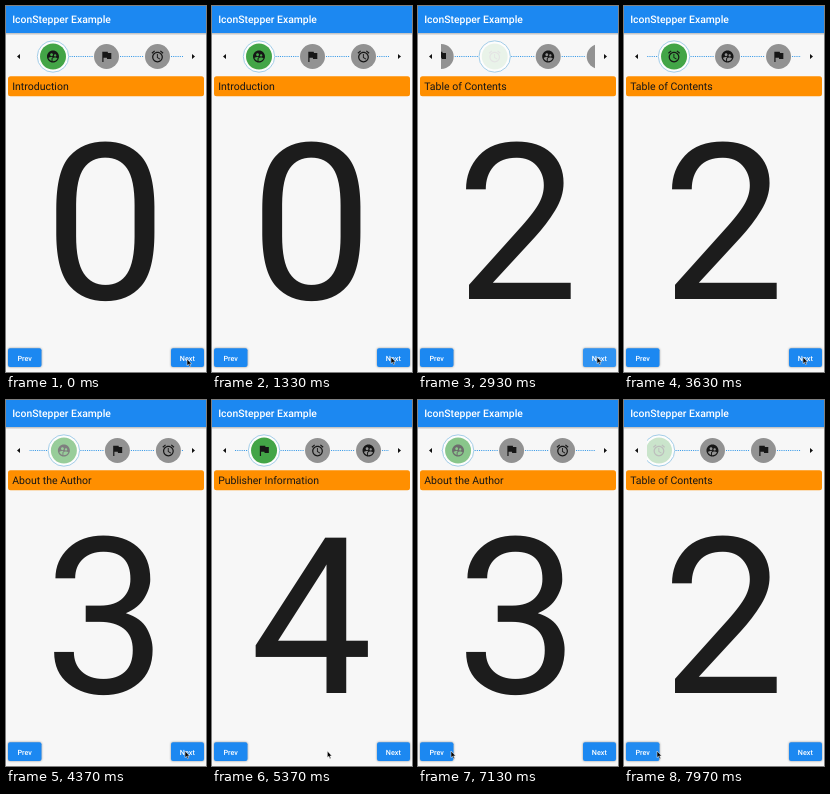
An HTML page for the animation above (8000 ms loop, 200x366 px).

```html
<!DOCTYPE html>
<html lang="en">
<head>
<meta charset="utf-8">
<title>Icon stepper</title>
<style>
  html, body { margin: 0; width: 100%; height: 100%; overflow: hidden; background: #f7f7f7; }
  svg { display: block; width: 100vw; height: 100vh; }
  text { font-family: Roboto, Arial, sans-serif; text-rendering: geometricPrecision; }
  .btn rect { fill: #1c88f1; filter: drop-shadow(0 .8px .8px rgba(0, 0, 0, .4)); }
  .btn .glow { fill: #fff; filter: none; }
  .btn text { fill: #fff; font-size: 7.2px; font-weight: 500; text-anchor: middle; }
</style>
</head>
<body>
<svg viewBox="0 0 200 366" xmlns="http://www.w3.org/2000/svg">
  <defs>
    <clipPath id="view"><rect x="23" y="30" width="154" height="40"/></clipPath>
    <linearGradient id="shade" x2="0" y2="1">
      <stop stop-color="#000" stop-opacity=".25"/>
      <stop offset="1" stop-color="#000" stop-opacity="0"/>
    </linearGradient>
    <path id="people" d="M11.99 2c-5.52 0-10 4.48-10 10s4.48 10 10 10 10-4.48 10-10-4.48-10-10-10zm3.61 6.34c1.07 0 1.93.86 1.93 1.93 0 1.07-.86 1.93-1.93 1.93-1.07 0-1.93-.86-1.93-1.93-.01-1.07.86-1.93 1.93-1.93zm-6-1.58c1.3 0 2.36 1.06 2.36 2.36 0 1.3-1.06 2.36-2.36 2.36s-2.36-1.06-2.36-2.36c0-1.31 1.05-2.36 2.36-2.36zm0 9.13v3.75c-2.4-.75-4.3-2.6-5.14-4.96 1.05-1.12 3.67-1.69 5.14-1.69.53 0 1.2.08 1.9.22-1.64.87-1.9 2.02-1.9 2.68zM11.99 20c-.27 0-.53-.01-.79-.04v-4.07c0-1.42 2.94-2.13 4.4-2.13 1.07 0 2.92.39 3.84 1.15-1.17 2.97-4.06 5.09-7.45 5.09z"/>
    <path id="flag" d="M14.4 6L14 4H5v17h2v-7h5.6l.4 2h7V6z"/>
    <path id="alarm" d="M22 5.72l-4.6-3.86-1.29 1.53 4.6 3.86L22 5.72zM7.88 3.39L6.6 1.86 2 5.71l1.29 1.53 4.59-3.85zM12.5 8H11v6l4.75 2.85.75-1.23-4-2.37V8zM12 4c-4.97 0-9 4.03-9 9s4.02 9 9 9c4.97 0 9-4.03 9-9s-4.03-9-9-9zm0 16c-3.87 0-7-3.13-7-7s3.13-7 7-7 7 3.13 7 7-3.13 7-7 7z"/>
  </defs>
  <rect width="200" height="366" fill="#f7f7f7"/>
  <rect y="27" width="200" height="2.5" fill="url(#shade)"/>
  <rect width="200" height="27" fill="#1c88f1"/>
  <text x="6.2" y="16.8" font-size="10.4" font-weight="500" fill="#fff">IconStepper Example</text>
  <path d="M14 48v5l-3-2.5zM186 48v5l3-2.5z" fill="#111"/>
  <g id="track" clip-path="url(#view)"></g>
  <rect x="2" y="70.2" width="196" height="20" rx="2.5" fill="#ff8f00"/>
  <text id="label" x="6.2" y="84.3" font-size="10.5" fill="#161616"></text>
  <text id="digit" x="99.5" y="293" font-size="218.5" fill="#1c1c1c" text-anchor="middle"></text>
  <g class="btn">
    <rect x="2" y="342.2" width="33.5" height="18.8" rx="2"/>
    <rect id="glowPrev" class="glow" x="2" y="342.2" width="33.5" height="18.8" rx="2"/>
    <text x="18.7" y="354.6">Prev</text>
  </g>
  <g class="btn">
    <rect x="165" y="342.2" width="33" height="18.8" rx="2"/>
    <rect id="glowNext" class="glow" x="165" y="342.2" width="33" height="18.8" rx="2"/>
    <text x="181.3" y="354.6">Next</text>
  </g>
  <path id="cursor" d="M0 0v6.6l1.5-1.3 1.1 2.4 1.1-.5-1.1-2.3h2z" fill="#000" stroke="#fff" stroke-width=".5"/>
</svg>
<script>
const LOOP = 8000, GAP = 51, SCROLL = 49.85, COUNT = 8, DURATION = 1000, ROW = 50.5;
const labels = ['Introduction', 'Preface', 'Table of Contents', 'About the Author', 'Publisher Information'];
const icons = ['people', 'flag', 'alarm'];
const clicks = [[1536, 1], [2687, 2], [3941, 3], [4450, 4], [6660, 3], [7664, 2]];
const $ = id => document.getElementById(id);

function add(parent, tag, attrs) {
  const el = document.createElementNS('http://www.w3.org/2000/svg', tag);
  set(el, attrs);
  return parent.appendChild(el);
}
function set(el, attrs) {
  for (const k in attrs) el.setAttribute(k, attrs[k]);
}
const clamp = v => Math.min(1, Math.max(0, v));
const smooth = v => (v = clamp(v), v * v * (3 - 2 * v));

function bounceOut(t) {
  const k = 7.5625;
  if (t < 1 / 2.75) return k * t * t;
  if (t < 2 / 2.75) return k * (t - 1.5 / 2.75) ** 2 + .75;
  if (t < 2.5 / 2.75) return k * (t - 2.25 / 2.75) ** 2 + .9375;
  return k * (t - 2.625 / 2.75) ** 2 + .984375;
}
const fadeIn = t => 1 - (1 - clamp((t - .21) / .79)) ** 2.4;

const steps = Array.from({ length: COUNT }, (_, i) => {
  const g = add($('track'), 'g', {});
  const line = i < COUNT - 1 && add(g, 'path', {
    stroke: '#3a9be8', 'stroke-width': 1, 'stroke-dasharray': '1.1 1.1'
  });
  const ring = add(g, 'circle', { r: 15.7, fill: '#fdfdfd', stroke: '#a3cde8', 'stroke-width': 1 });
  const face = add(g, 'g', {});
  const disc = add(face, 'circle', {});
  add(face, 'use', { href: '#' + icons[i % 3], transform: 'scale(.6) translate(-12 -12)', fill: '#161616' });
  return { g, line, ring, face, disc };
});

// Each click restarts the scroll from wherever the track is.
function stateAt(time) {
  let from = 0, index = 0, start = -DURATION, dir = 1;
  const offset = at => from + (index * SCROLL - from) * bounceOut(clamp((at - start) / DURATION));
  for (const [at, next] of clicks) {
    if (at > time) break;
    from = offset(at);
    dir = next > index ? 1 : -1;
    index = next;
    start = at;
  }
  return { index, dir, age: time - start, offset: offset(time) };
}

function draw(time) {
  const { index, dir, age, offset } = stateAt(time);
  const fade = fadeIn(age / DURATION);
  steps.forEach((s, i) => {
    const on = i === index;
    const x = 47 + GAP * i + 2.5 * Math.sign(i - index) - offset;
    set(s.g, { transform: `translate(${x} ${ROW})` });
    set(s.ring, { visibility: on ? 'visible' : 'hidden' });
    set(s.face, { opacity: on ? fade : 1 });
    set(s.disc, { r: on ? 13 : 12.5, fill: on ? '#43a547' : '#929292' });
    if (s.line) set(s.line, { d: `M${on ? 16.5 : 13.5} 0h${on || i === index - 1 ? 23.5 : 24}` });
  });
  $('label').textContent = labels[index];
  $('digit').textContent = index;
  const glow = .16 * clamp((330 - age) / 150);
  set($('glowNext'), { opacity: dir > 0 ? glow : 0 });
  set($('glowPrev'), { opacity: dir < 0 ? glow : 0 });
  const settle = smooth((time - 300) / 900);
  const cx = 181 - 2 * settle - 146 * smooth((time - 4900) / 1030);
  set($('cursor'), { transform: `translate(${cx} ${353 - 2 * settle})` });
}

function tick(now) {
  draw(now % LOOP);
  requestAnimationFrame(tick);
}
draw(0);
requestAnimationFrame(tick);
</script>
</body>
</html>
```
